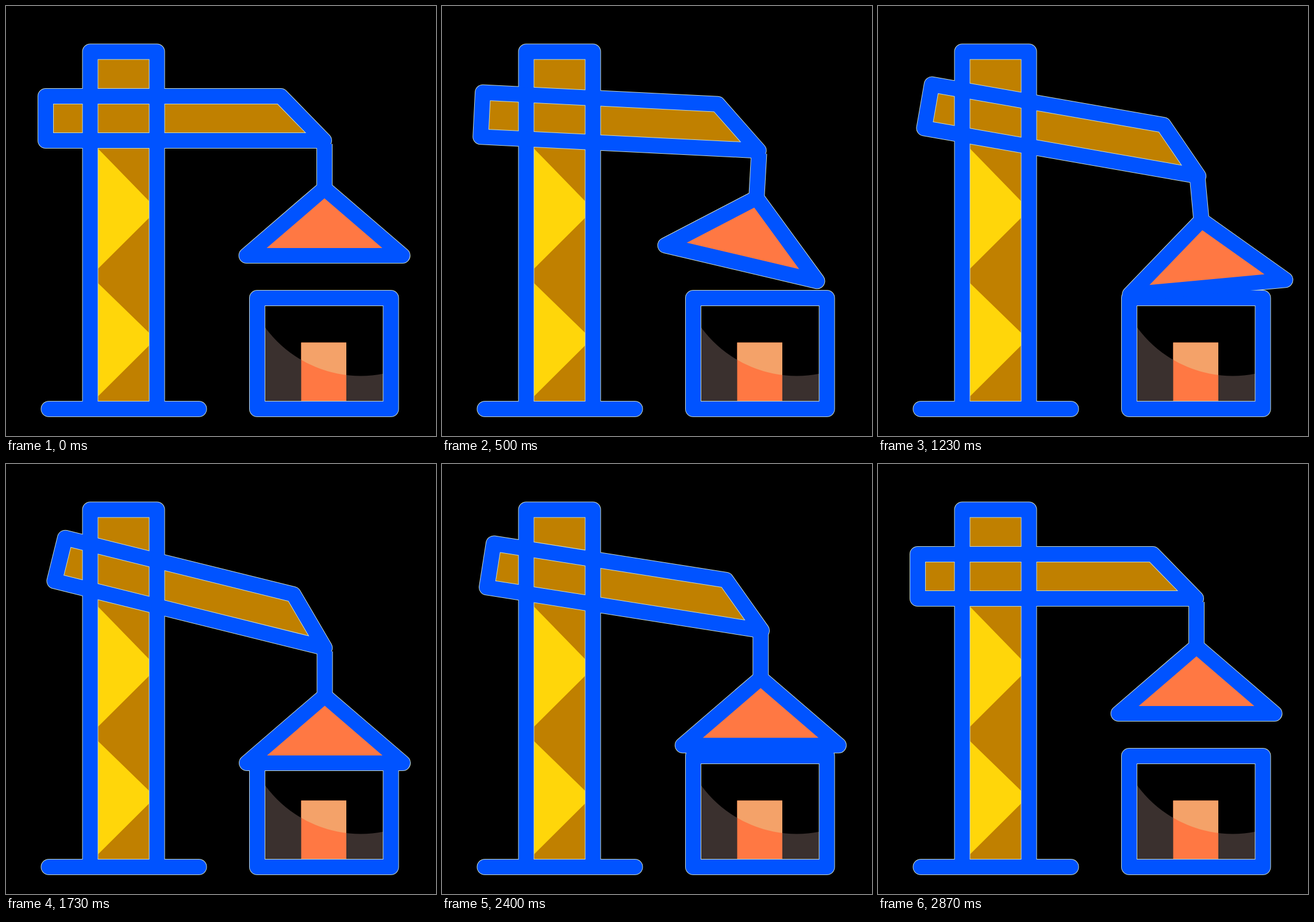
Animation of 748 by 748 pixels, one loop 2.9 s. Source, as an HTML page:

```html
<!DOCTYPE html>
<html>
<head>
<meta charset="utf-8">
<style>
  html, body { margin: 0; height: 100%; overflow: hidden; background: #000; }
  svg { display: block; width: 100vw; height: 100vh; }
</style>
</head>
<body>
<svg viewBox="0 0 748 748">
  <defs>
    <clipPath id="disc"><circle cx="617" cy="437.7" r="205.8"/></clipPath>
    <g id="frame" fill="none" stroke-linejoin="round">
      <path d="M146.5 701V79.5H262.5V701"/>
      <path d="M74.5 701H335.5" stroke-linecap="round"/>
      <path d="M437 508H669.5V701H437Z"/>
      <path class="boom" d="M69 157H478L553 234H69Z"/>
    </g>
    <g id="load" class="hook" fill="none" stroke-linejoin="round">
      <path d="M0 6V84"/>
      <path class="roof" d="M0 83.5L135.5 200H-135.5Z"/>
    </g>
  </defs>

  <!-- house interior -->
  <path fill="#3a302e" d="M437 508H669V701H437Z"/>
  <path clip-path="url(#disc)" d="M437 508H669V701H437Z"/>
  <path fill="#ff7843" d="M513.5 585.5H592V695H513.5Z"/>
  <path fill="#f4a269" clip-path="url(#disc)" d="M513.5 585.5H592V695H513.5Z"/>

  <!-- crane body -->
  <path fill="#c08000" d="M146 79H263V701H146Z"/>
  <path fill="#ffd60a" d="M147 235L160 248L249.5 340V368L160 457L147 470L160 482L249.5 569V590L160 679L147 692Z"/>
  <path class="boom" fill="#c08000" d="M69 157H478L553 234H69Z"/>

  <!-- pale rim, then the blue lines with the roof in front of the house -->
  <g stroke="#c8dccc" stroke-width="28">
    <use href="#frame"/>
    <use href="#load"/>
  </g>
  <g stroke="#0053ff" stroke-width="26">
    <use href="#frame"/>
    <g class="hook" stroke="none"><path class="roof" fill="#ff7843" d="M0 83.5L135.5 200H-135.5Z"/></g>
    <use href="#load"/>
  </g>
</svg>
<script>
const LOOP = 2900;
const SWING = [0, 500, 900, 1384, 2095, 2845];
const LIFT = [0, 500, 900, 1401, 2095, 2845];

// Sine-eased value between keys
function tween(t, times, values) {
  const i = times.findIndex(k => k > t);
  if (i < 0) return values[values.length - 1];
  const u = (t - times[i - 1]) / (times[i] - times[i - 1]);
  const p = (1 - Math.cos(Math.PI * u)) / 2;
  return values[i - 1] + (values[i] - values[i - 1]) * p;
}

function place(name, transform) {
  for (const el of document.querySelectorAll('.' + name)) el.setAttribute('transform', transform);
}

function draw(t) {
  const tilt = tween(t, SWING, [0, 2.85, -3.65, 13.9, 13.9, 0]);
  const slide = tween(t, SWING, [0, 0, 0, 20.8, 20.8, 0]);
  const sway = tween(t, SWING, [0, 3.2, -23.5, 0, 0, 0]);
  const twist = tween(t, SWING, [0, 10, 0, 0, 0, 0]);
  const x = tween(t, LIFT, [554, 551.8, 555.7, 554.5, 554.5, 554]);
  const y = tween(t, LIFT, [234, 250.6, 203, 320, 320, 234]);
  place('boom', `translate(${slide} ${slide * 0.11}) rotate(${tilt} 201 195.5)`);
  place('hook', `translate(${x} ${y}) rotate(${sway})`);
  place('roof', `rotate(${twist} 0 83.5)`);
}

const start = performance.now();
function frame() {
  draw((performance.now() - start) % LOOP);
  requestAnimationFrame(frame);
}
frame();
</script>
</body>
</html>
```
